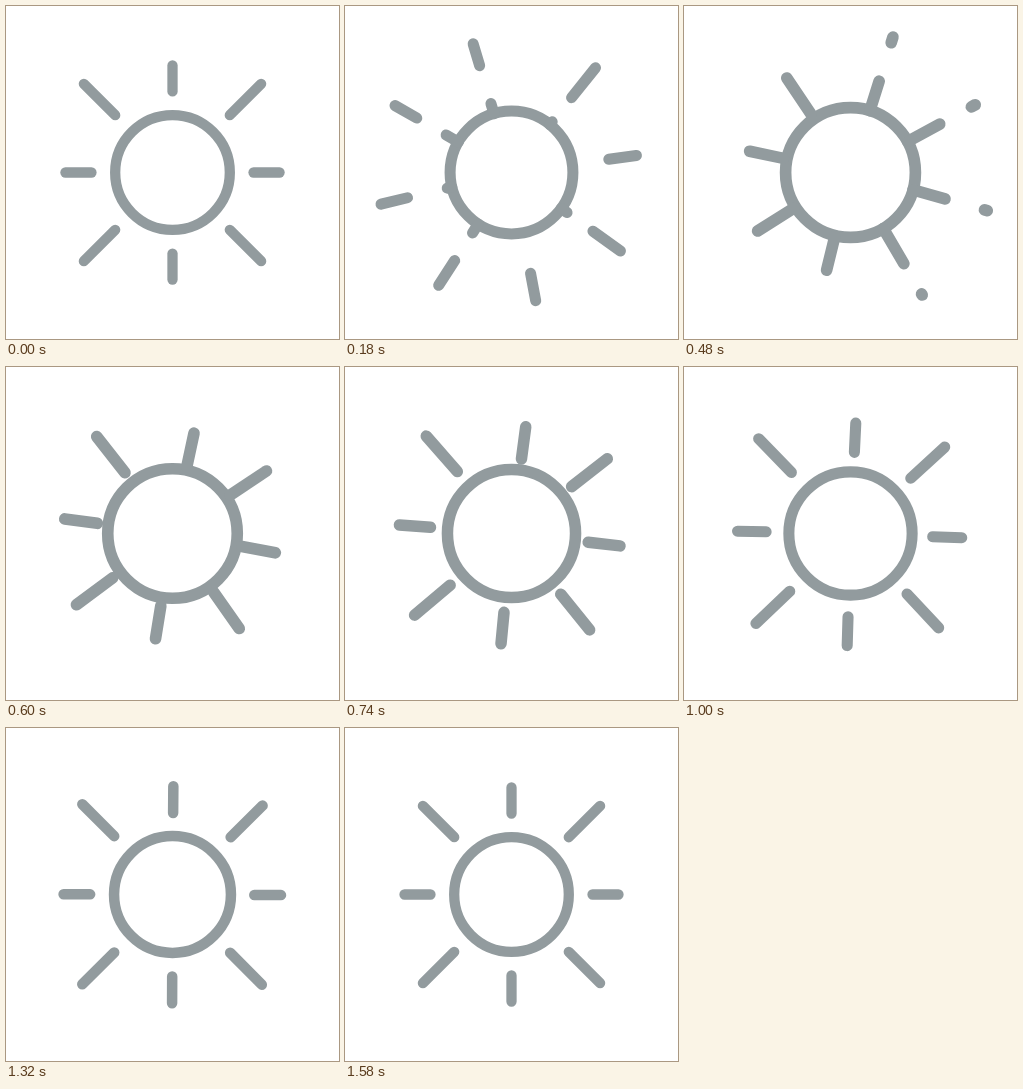
Write an HTML page that moves like this. It is 333x333 px and loops after 1600 ms.

```html
<!DOCTYPE html>
<html lang="en">
<head>
<meta charset="utf-8">
<title>Sun</title>
<style>
  html, body { margin: 0; width: 100%; height: 100%; overflow: hidden; background: #fff; }
  svg { display: block; width: 100%; height: 100%; }
</style>
</head>
<body>
<svg viewBox="0 0 333 333">
  <g id="sun" fill="none" stroke="#929b9e" stroke-width="10.3" stroke-linecap="round">
    <circle r="57.3"/>
  </g>
</svg>
<script>
const LOOP = 1600, COUNT = 8, STEP = 45;
const RING = 57.3, INNER = 81, REACH = 125.3, TRAVEL = 68;
const SHORT = { tip: 107, grow: 53 }, LONG = { tip: REACH, grow: 88 };
const PEAK = 500, SWELL = 0.133;

const sun = document.getElementById('sun');

function addLine(parent) {
  const line = document.createElementNS('http://www.w3.org/2000/svg', 'line');
  parent.appendChild(line);
  return line;
}

const rays = Array.from({ length: COUNT }, () => {
  const group = document.createElementNS('http://www.w3.org/2000/svg', 'g');
  sun.appendChild(group);
  return { group, leaving: addLine(group), entering: addLine(group) };
});

const kind = i => i % 2 ? LONG : SHORT;

// Draws one radial dash, hidden when it has no length left.
function setDash(line, from, to) {
  const shown = to > from;
  line.setAttribute('visibility', shown ? 'visible' : 'hidden');
  if (!shown) return;
  line.setAttribute('y1', -from);
  line.setAttribute('y2', -to);
}

function swell(t) {
  const k = t < PEAK
    ? Math.sin(t / PEAK * Math.PI / 2)
    : (1 + Math.cos((t - PEAK) / (LOOP - PEAK) * Math.PI)) / 2;
  return 1 + SWELL * k;
}

// Degrees still to turn; later rays lead, the first ray trails.
function turnLeft(i, t) {
  const r = 1 - Math.max(0, t - 8) / (LOOP - 8);
  const lag = (COUNT - 1 - i) / (COUNT - 1) * 13;
  return Math.min(STEP, STEP * r ** 4 + lag * r ** 2);
}

function draw(t) {
  sun.setAttribute('transform', `translate(166.5 166.5) scale(${swell(t)})`);
  rays.forEach((ray, i) => {
    const turn = turnLeft(i, t);
    const left = (turn / STEP) ** 0.9;
    const push = TRAVEL * (1 - left);
    const { tip, grow } = kind(i);
    ray.group.setAttribute('transform', `rotate(${STEP * i + turn})`);
    setDash(ray.leaving, INNER + push, Math.min(REACH, kind(i + 1).tip + push));
    setDash(ray.entering, Math.max(RING, INNER - TRAVEL * left), tip - grow * left);
  });
}

const start = performance.now();
function tick(now) {
  draw(Math.max(0, now - start) % LOOP);
  requestAnimationFrame(tick);
}
draw(0);
requestAnimationFrame(tick);
</script>
</body>
</html>
```
